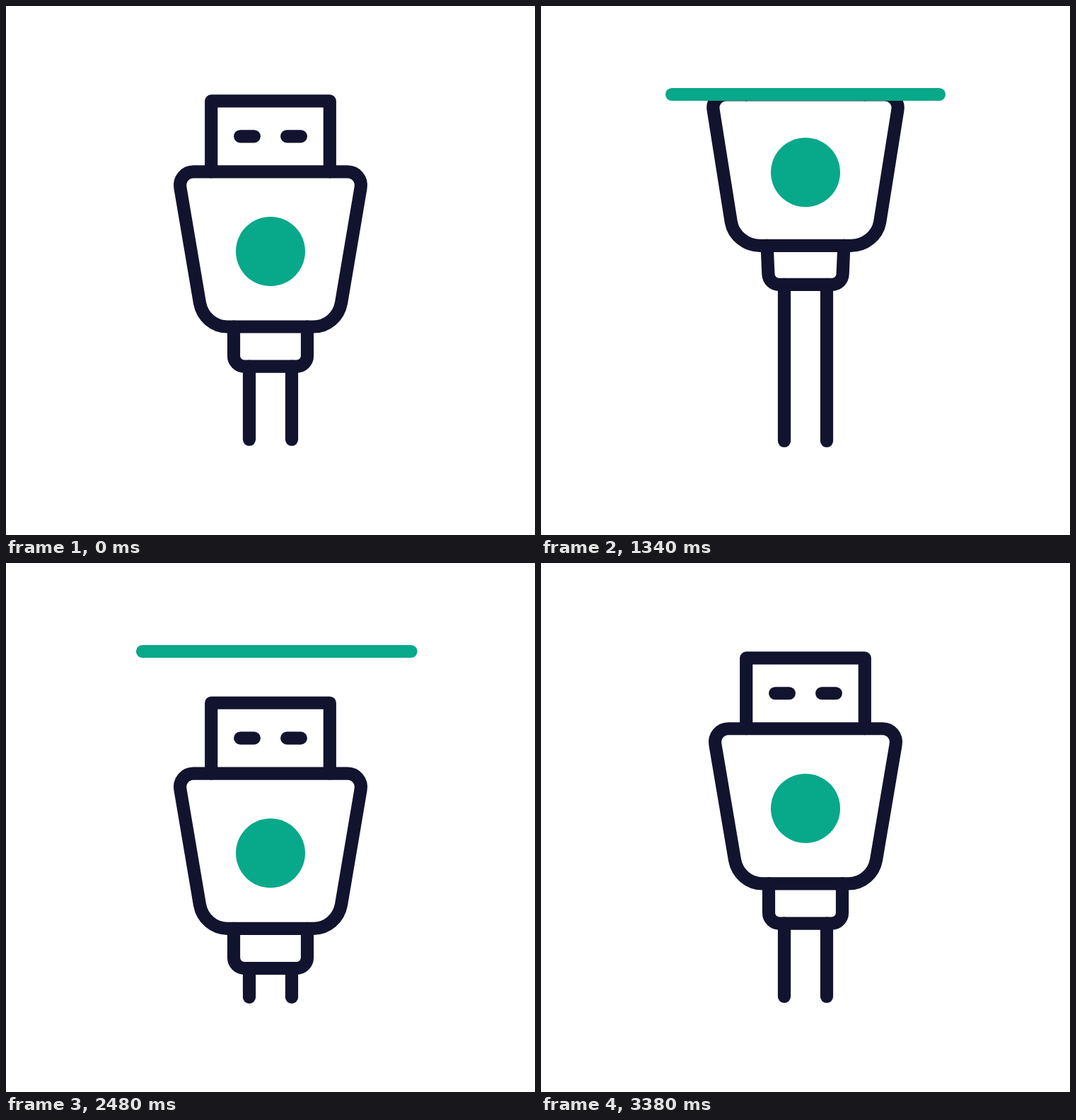
Write an HTML page with a canvas that moves like this. It is 748 px wide and 748 px high and loops after 3620 ms.

```html
<!DOCTYPE html>
<html lang="en">
<head>
<meta charset="utf-8">
<title>Plug</title>
<style>
  html, body { margin: 0; width: 100%; height: 100%; overflow: hidden; background: #fff; }
  canvas { display: block; width: 748px; height: 748px; }
</style>
</head>
<body>
<canvas id="stage" width="748" height="748"></canvas>
<script>
const ctx = document.getElementById('stage').getContext('2d');
const NAVY = '#12132e', GREEN = '#08a88a';
const LOOP = 3620, STEP = 30, LEAD = 20;
const DOWN = 77, SEATED = -126, OVER = -16, PORT_STOP = -109, PORT_Y = 125;

const mix = (a, b, k) => a + (b - a) * k;
const clamp = v => Math.min(1, Math.max(0, v));
const span = (t, a, b) => clamp((t - a) / (b - a));

// Quick start with a long settling tail; dt in ms.
const settle = (dt, tau, power = 1.2) =>
  dt <= 0 ? 0 : 1 - Math.exp(-Math.pow(dt / tau, power));

// Cubic easing with horizontal handles a and b.
function ease(x, a, b) {
  if (x <= 0 || x >= 1) return clamp(x);
  let lo = 0, hi = 1;
  for (let i = 0; i < 24; i++) {
    const s = (lo + hi) / 2, r = 1 - s;
    if (3 * r * r * s * a + 3 * r * s * s * b + s * s * s < x) lo = s;
    else hi = s;
  }
  return lo * lo * (3 - 2 * lo);
}

function plugOffset(t) {
  if (t < 1050) return DOWN * settle(t - 500, 105);
  if (t < 1610) return mix(DOWN, SEATED, settle(t - 1050, 120));
  if (t < 1950) return SEATED;
  if (t < 2490) return mix(DOWN, SEATED, settle(2490 - t, 92));
  if (t < 3050) return mix(DOWN, OVER, ease(span(t, 2510, 3050), 0.77, 0.75));
  return mix(OVER, 0, ease(span(t, 3050, 3390), 0.33, 0.67));
}

function portEnds(t) {
  if (t <= 500 || t >= 3020) return null;
  if (t < 2400) return [
    mix(13, 185, settle(t - 500, 196, 1.6)),
    mix(13, 563, settle(t - 500, 129))
  ];
  const p = span(t, 2400, 3020);
  return [mix(185, 739, ease(p, 0.65, 0.65)), mix(563, 739, ease(p, 0.28, 0.75))];
}

function stroke(color, build) {
  ctx.strokeStyle = color;
  ctx.beginPath();
  build();
  ctx.stroke();
}

function segment(color, x1, y1, x2, y2) {
  stroke(color, () => {
    ctx.moveTo(x1, y1);
    ctx.lineTo(x2, y2);
  });
}

function drawConnector(dy) {
  stroke(NAVY, () => {
    ctx.moveTo(290.2, 234.3 + dy);
    ctx.lineTo(290.2, 134.4 + dy);
    ctx.lineTo(457.8, 134.4 + dy);
    ctx.lineTo(457.8, 234.3 + dy);
  });
  for (const x of [331.2, 397.2]) segment(NAVY, x, 184.3 + dy, x + 19.6, 184.3 + dy);
}

function drawBody(top, bottom, squash) {
  const y = v => mix(234.3 + top, 453.5 + bottom, (v - 234.3) / 219.2);
  const up = squash * 0.48, low = squash * 0.9, foot = squash * 0.62;
  const L = (v, d) => v - d, R = (v, d) => 748 - v + d;
  stroke(NAVY, () => {
    ctx.moveTo(L(265, up), y(234.3));
    ctx.lineTo(R(265, up), y(234.3));
    ctx.bezierCurveTo(R(253, up), y(234.3), R(244.3, up), y(245), R(246.4, up), y(257));
    ctx.lineTo(R(274, low), y(420));
    ctx.bezierCurveTo(R(277.5, low), y(439.5), R(294, foot), y(453.5), R(313, foot), y(453.5));
    ctx.lineTo(L(313, foot), y(453.5));
    ctx.bezierCurveTo(L(294, foot), y(453.5), L(277.5, low), y(439.5), L(274, low), y(420));
    ctx.lineTo(L(246.4, up), y(257));
    ctx.bezierCurveTo(L(244.3, up), y(245), L(253, up), y(234.3), L(265, up), y(234.3));
    ctx.closePath();
  });
}

function drawCollar(bottom, squash) {
  const top = 453.5 + bottom, base = 509.7 + bottom - squash * 0.22;
  const flare = squash * 0.42;
  stroke(NAVY, () => {
    ctx.moveTo(322 - flare, top);
    ctx.arcTo(322, base, 374, base, 15);
    ctx.arcTo(426, base, 426 + flare, top, 15);
    ctx.lineTo(426 + flare, top);
  });
  return base;
}

function draw(t) {
  const bottom = plugOffset(t);
  const top = Math.max(bottom, PORT_STOP);
  const squash = top - bottom;
  const inPort = t > 1050 && t < 2490;

  ctx.fillStyle = '#fff';
  ctx.fillRect(0, 0, 748, 748);
  ctx.lineWidth = 18.2;
  ctx.lineCap = ctx.lineJoin = 'round';

  ctx.save();
  if (inPort) {
    ctx.beginPath();
    ctx.rect(0, PORT_Y, 748, 748 - PORT_Y);
    ctx.clip();
  }
  drawConnector(top);
  drawBody(top, bottom, squash);
  const base = drawCollar(bottom, squash);
  const end = inPort ? 613.8 + (DOWN - bottom) * 0.006 : 613 + Math.max(bottom, 0) * 0.01;
  for (const x of [344, 404]) segment(NAVY, x, base, x, end);

  ctx.fillStyle = GREEN;
  ctx.beginPath();
  ctx.arc(374, 347 + (top + bottom) / 2, 49, 0, Math.PI * 2);
  ctx.fill();
  ctx.restore();

  const port = portEnds(t);
  if (port) segment(GREEN, port[0], PORT_Y, port[1], PORT_Y);
}

const start = performance.now();
function tick() {
  const t = (performance.now() - start) % LOOP;
  draw(Math.max(0, Math.floor((t - LEAD) / STEP) * STEP + LEAD));
  requestAnimationFrame(tick);
}
tick();
</script>
</body>
</html>
```
